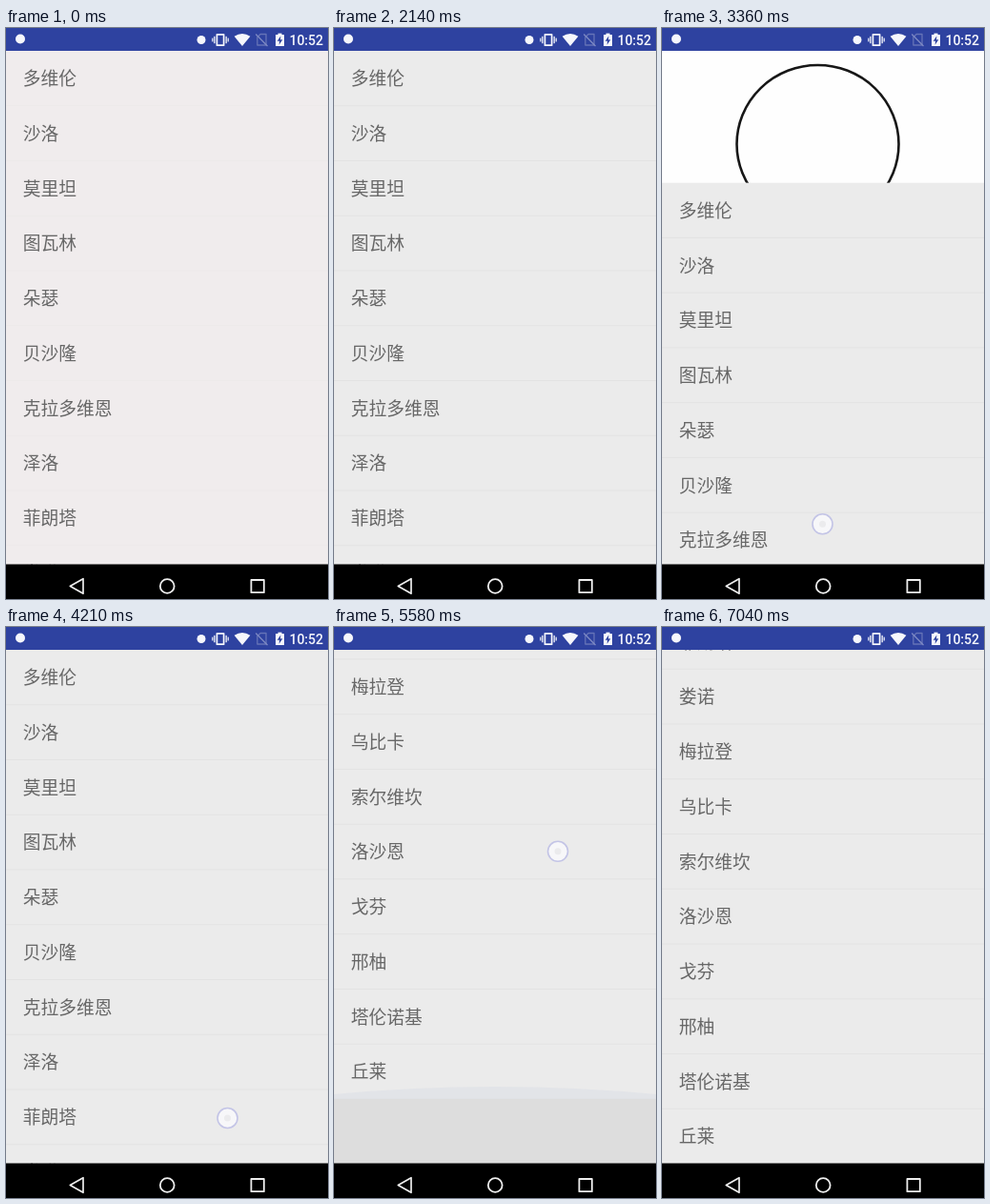
Recreate the animation shown at these times as an HTML page with a canvas. Size 338 by 600 pixels, loop 8590 ms.

```html
<!DOCTYPE html>
<html lang="zh-CN">
<head>
<meta charset="utf-8">
<title>Elastic list</title>
<style>
html, body { margin: 0; width: 100%; height: 100%; overflow: hidden; background: #000; }
canvas { display: block; width: 338px; height: 600px; }
</style>
</head>
<body>
<canvas id="stage"></canvas>
<script>
const W = 338, H = 600, TOP = 24, BOTTOM = 564, ROW = 57.75, LOOP = 8590;
const names = ['多维伦', '沙洛', '莫里坦', '图瓦林', '朵瑟', '贝沙隆', '克拉多维恩', '泽洛', '菲朗塔',
  '娄诺', '梅拉登', '乌比卡', '索尔维坎', '洛沙恩', '戈芬', '邢柚', '塔伦诺基', '丘莱'];
const END = names.length * ROW - (BOTTOM - TOP);

// Each drag past an edge: finger start, direction, peak stretch and times.
const pulls = [
  { from: 400, release: 1580, rest: 2080, peak: 78, x: 169, y: 327, dir: 1 },
  { from: 2360, release: 3440, rest: 3940, peak: 140.8, x: 168.5, y: 244, dir: 1 },
  { from: 5100, release: 5620, rest: 5960, peak: 69.2, x: 235, y: 372, dir: -1 },
  { from: 6410, release: 6730, rest: 7040, peak: 50, x: 233, y: 372, dir: -1 }
];
const swipe = { from: 4230, release: 4560, rest: 5060, x: 232.5, y: 516, length: 266 };

const canvas = document.getElementById('stage');
const ctx = canvas.getContext('2d');
const dpr = window.devicePixelRatio || 1;
canvas.width = W * dpr;
canvas.height = H * dpr;

const part = (t, a, b) => Math.min(1, Math.max(0, (t - a) / (b - a)));
const smooth = p => p * p * (3 - 2 * p);
const easeOut = p => 1 - (1 - p) ** 3;

function stateAt(t) {
  const drag = swipe.length * part(t, swipe.from, swipe.release) ** 2;
  const fling = (END - swipe.length) * easeOut(part(t, swipe.release, swipe.rest));
  const state = { scroll: drag + fling, stretch: 0, finger: null };
  if (t >= swipe.from - 20 && t < swipe.release) state.finger = [swipe.x, swipe.y - drag];
  for (const p of pulls) {
    if (t < p.from || t > p.rest) continue;
    const held = t < p.release;
    const size = held
      ? p.peak * smooth(part(t, p.from, p.release))
      : p.peak * (1 - easeOut(part(t, p.release, p.rest)));
    state.stretch = size * p.dir;
    // The list follows at half the finger's speed.
    if (held) state.finger = [p.x, p.y + 2 * state.stretch];
  }
  return state;
}

function rect(x, y, w, h, color) {
  ctx.fillStyle = color;
  ctx.fillRect(x, y, w, h);
}

function disc(x, y, r, color) {
  ctx.beginPath();
  ctx.arc(x, y, r, 0, Math.PI * 2);
  ctx.fillStyle = color;
  ctx.fill();
}

function path(points, close) {
  ctx.beginPath();
  points.forEach(([x, y]) => ctx.lineTo(x, y));
  if (close) ctx.closePath();
}

function stroke(color, width) {
  ctx.strokeStyle = color;
  ctx.lineWidth = width;
  ctx.stroke();
}

function drawHeader() {
  rect(0, TOP, W, BOTTOM - TOP, '#fefefe');
  ctx.beginPath();
  ctx.ellipse(163.5, 122, 85, 83, 0, 0, Math.PI * 2);
  stroke('#171717', 2.6);
}

function drawGlow(edge, size) {
  const k = Math.min(1, size / 68);
  ctx.beginPath();
  ctx.moveTo(0, edge);
  ctx.lineTo(0, edge - 5 * k);
  ctx.quadraticCurveTo(W / 2, edge - 21 * k, W, edge - 5 * k);
  ctx.lineTo(W, edge);
  ctx.fillStyle = 'rgba(90, 120, 190, 0.06)';
  ctx.fill();
}

function drawList(t, { scroll, stretch }) {
  ctx.save();
  ctx.beginPath();
  ctx.rect(0, TOP, W, BOTTOM - TOP);
  ctx.clip();
  if (stretch > 0) drawHeader();
  else rect(0, TOP, W, BOTTOM - TOP, '#dddddd');

  const first = TOP - scroll + stretch;
  const edge = first + names.length * ROW;
  const idle = t < 360;
  rect(0, first, W, edge - first, idle ? '#f0eced' : '#ebebeb');
  ctx.font = '18.75px "Noto Sans CJK SC", "Noto Sans CJK", sans-serif';
  ctx.textAlign = 'left';
  ctx.textBaseline = 'alphabetic';
  names.forEach((name, i) => {
    const y = first + i * ROW;
    if (y > BOTTOM || y + ROW < TOP) return;
    if (i) rect(0, y - 0.5, W, 1, idle ? '#edeaea' : '#e3e3e3');
    ctx.fillStyle = '#676767';
    ctx.fillText(name, 17.7, y + 36.2);
  });
  if (stretch < 0) drawGlow(edge, -stretch);
  ctx.restore();
}

function drawFinger([x, y]) {
  disc(x, y, 10.5, 'rgba(248, 248, 251, 0.9)');
  stroke('#c3c4e6', 1.6);
  disc(x, y, 3.5, '#ebebed');
}

function drawStatus() {
  const bar = '#2e42a0', white = '#f6f7fc';
  rect(0, 0, W, TOP, bar);
  disc(15, 11.5, 5, white);
  disc(205, 12.5, 4.5, white);

  ctx.beginPath();
  ctx.rect(221.4, 6.8, 7.2, 11.4);
  stroke(white, 1.7);
  rect(218.2, 8.8, 1.3, 7.4, white);
  rect(216.2, 10.6, 1.2, 3.8, white);
  rect(230.5, 8.8, 1.3, 7.4, white);
  rect(232.6, 10.6, 1.2, 3.8, white);

  ctx.beginPath();
  ctx.moveTo(248, 19);
  ctx.lineTo(239.6, 8.8);
  ctx.quadraticCurveTo(248, 3.2, 256.4, 8.8);
  ctx.closePath();
  ctx.fillStyle = white;
  ctx.fill();

  path([[267, 6.5], [273, 6.5], [273, 18], [263.8, 18], [263.8, 9.7]], true);
  stroke('#6573b7', 1.3);
  path([[262.2, 6.5], [274.5, 19]]);
  stroke('#7e8ac4', 1.3);

  rect(285.5, 5.6, 4, 2, white);
  rect(283, 7, 9, 12, white);
  path([[288.4, 8.3], [284.7, 13.7], [287, 13.7], [286.6, 17.7], [290.3, 12.2], [288, 12.2]], true);
  ctx.fillStyle = bar;
  ctx.fill();

  ctx.font = '500 14px Roboto, sans-serif';
  ctx.textAlign = 'right';
  ctx.textBaseline = 'alphabetic';
  ctx.fillStyle = white;
  ctx.fillText('10:52', 333, 17.5);
}

function drawNav() {
  rect(0, BOTTOM - 0.5, W, H - BOTTOM + 0.5, '#000');
  ctx.lineJoin = 'round';
  path([[67.3, 586.5], [81, 578.7], [81, 594.3]], true);
  stroke('#eee', 1.7);
  ctx.beginPath();
  ctx.arc(169.2, 586.5, 7.4, 0, Math.PI * 2);
  stroke('#eee', 1.8);
  ctx.beginPath();
  ctx.rect(257.4, 580, 13.4, 13.2);
  stroke('#eee', 1.8);
}

function draw(t) {
  const state = stateAt(t);
  ctx.setTransform(dpr, 0, 0, dpr, 0, 0);
  drawList(t, state);
  if (state.finger) drawFinger(state.finger);
  drawStatus();
  drawNav();
}

const start = performance.now();
function tick() {
  draw((performance.now() - start) % LOOP);
  requestAnimationFrame(tick);
}
tick();
</script>
</body>
</html>
```
